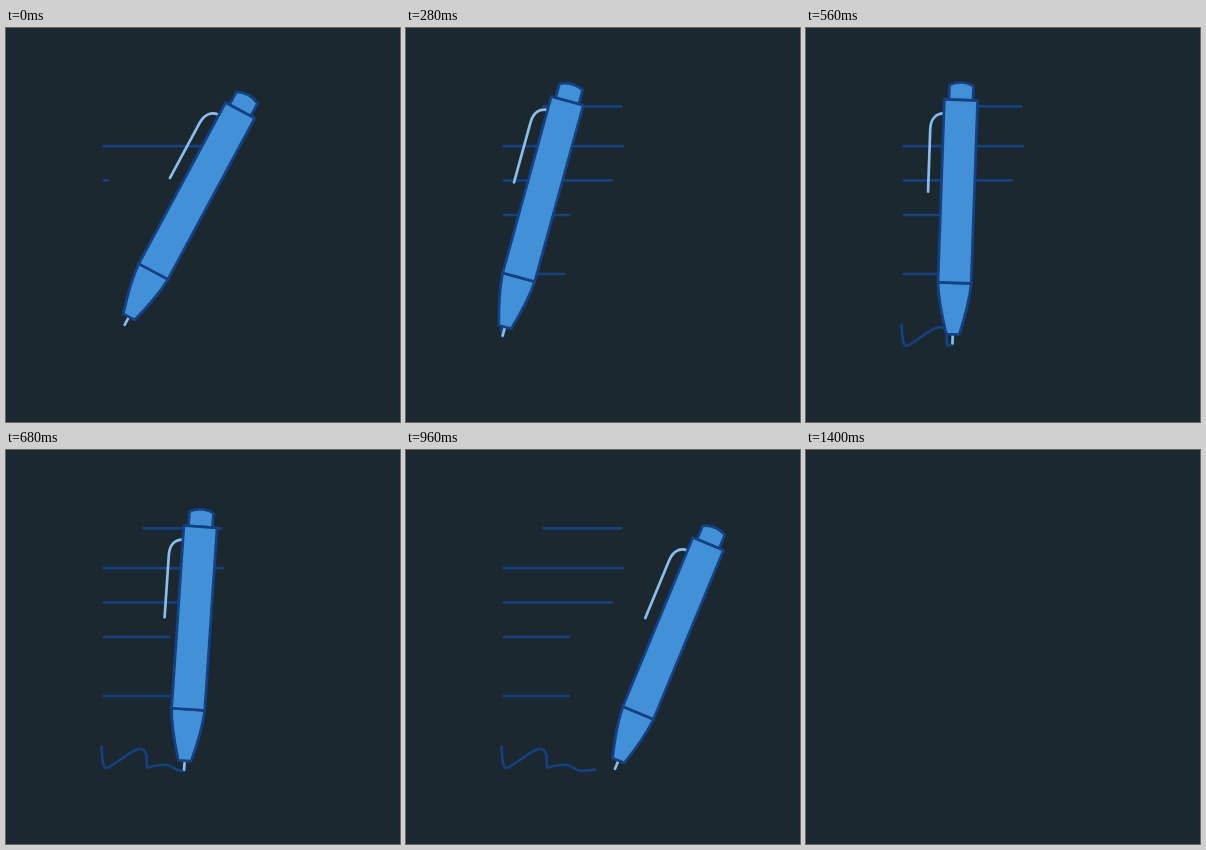
An HTML page for the animation above (1640 ms loop, 394 by 394 pixels).

```html
<!DOCTYPE html>
<html lang="en">
<head>
<meta charset="utf-8">
<title>Pen signing a page</title>
<style>
  html, body { margin: 0; height: 100%; overflow: hidden; background: #1c2830; }
  svg { display: block; width: 100%; height: 100%; }
  path { fill: none; stroke: #154081; stroke-width: 2.7; stroke-linecap: round; stroke-linejoin: round; }
  #pen .body { fill: #4291d8; }
  #pen .light { stroke: #8abdeb; }
</style>
</head>
<body>
<svg viewBox="0 0 394 394">
  <g id="scene">
    <g id="lines"></g>
    <path id="sign" d="M95.7 296.5C95.5 305 97 318 100 318C106 318 126 298 134 299C143 300 140 310 141 317.5C146 317 152 314 159 314.7C167 315 168 320.8 175 320.8C180 320.8 185 320 189 319.3"/>
    <!-- nib point at the origin, pen standing upright -->
    <g id="pen">
      <path class="light" d="M0 -10V-1"/>
      <path class="light" d="M-17 -230.5C-24 -230 -29.7 -225 -29.7 -214V-151.8"/>
      <path class="body" d="M-12 -244.5V-259Q0 -265 12 -259V-244.5Z"/>
      <path class="body" d="M-16.6 -61.5C-15.5 -43 -11 -26 -6.4 -10H6.4C11 -26 15.5 -43 16.6 -61.5Z"/>
      <path class="body" d="M-16.6 -61.5V-244.5H16.6V-61.5Z"/>
    </g>
  </g>
</svg>
<script>
const LOOP = 1640, STEP = 40;
const HELD = [40, 600]; // steps that repeat the pose before them
const LINE_TIME = 100;
const WRITE = 236, LIFT = 720, REST = 1160, FADE = 1240, GONE = 1400;

const get = id => document.getElementById(id);
const scene = get('scene'), sign = get('sign'), pen = get('pen');
const total = sign.getTotalLength();

// x, y, size and start time of each ruled line
const lines = [
  [137.5, 78.4, 77.5, 30],
  [97.8, 118.2, 119, -100],
  [97.8, 152.5, 108, -4],
  [97.8, 187, 65.5, 92],
  [97.8, 246, 65.5, 188]
].map(([x, y, size, start]) => {
  const el = document.createElementNS('http://www.w3.org/2000/svg', 'path');
  el.setAttribute('d', `M${x} ${y}h${size}`);
  get('lines').append(el);
  return { el, size, start };
});

const part = (t, from, to) => Math.min(1, Math.max(0, (t - from) / (to - from)));

function reveal(el, length) {
  el.style.visibility = length > 0 ? 'visible' : 'hidden';
  el.style.strokeDasharray = `${length} 999`;
}

function draw(now) {
  let t = Math.floor(now % LOOP / STEP) * STEP;
  if (HELD.includes(t)) t -= STEP;

  for (const { el, size, start } of lines) {
    reveal(el, size * part(t, start, start + LINE_TIME));
  }

  const ink = total * part(t, WRITE, LIFT);
  reveal(sign, ink);

  // Swoop to the start, follow the ink, then slide off to the right
  const tip = sign.getPointAtLength(ink);
  const come = part(t, 0, WRITE), leave = part(t, LIFT, REST);
  const x = tip.x + 22.5 * (1 - come) ** 2 + 36 * leave;
  const y = tip.y + 1.2 * (1 - come) + 6 * Math.sin(Math.PI * come) + 0.7 * leave;
  const turn = 28.3 - 26.3 * part(t, 10, 560) + 20.5 * part(t, 652, 960);
  pen.setAttribute('transform', `translate(${x} ${y}) rotate(${turn})`);

  scene.setAttribute('opacity', 1 - part(t, FADE, GONE));
}

const start = performance.now();
function tick() {
  draw(performance.now() - start);
  requestAnimationFrame(tick);
}
tick();
</script>
</body>
</html>
```
